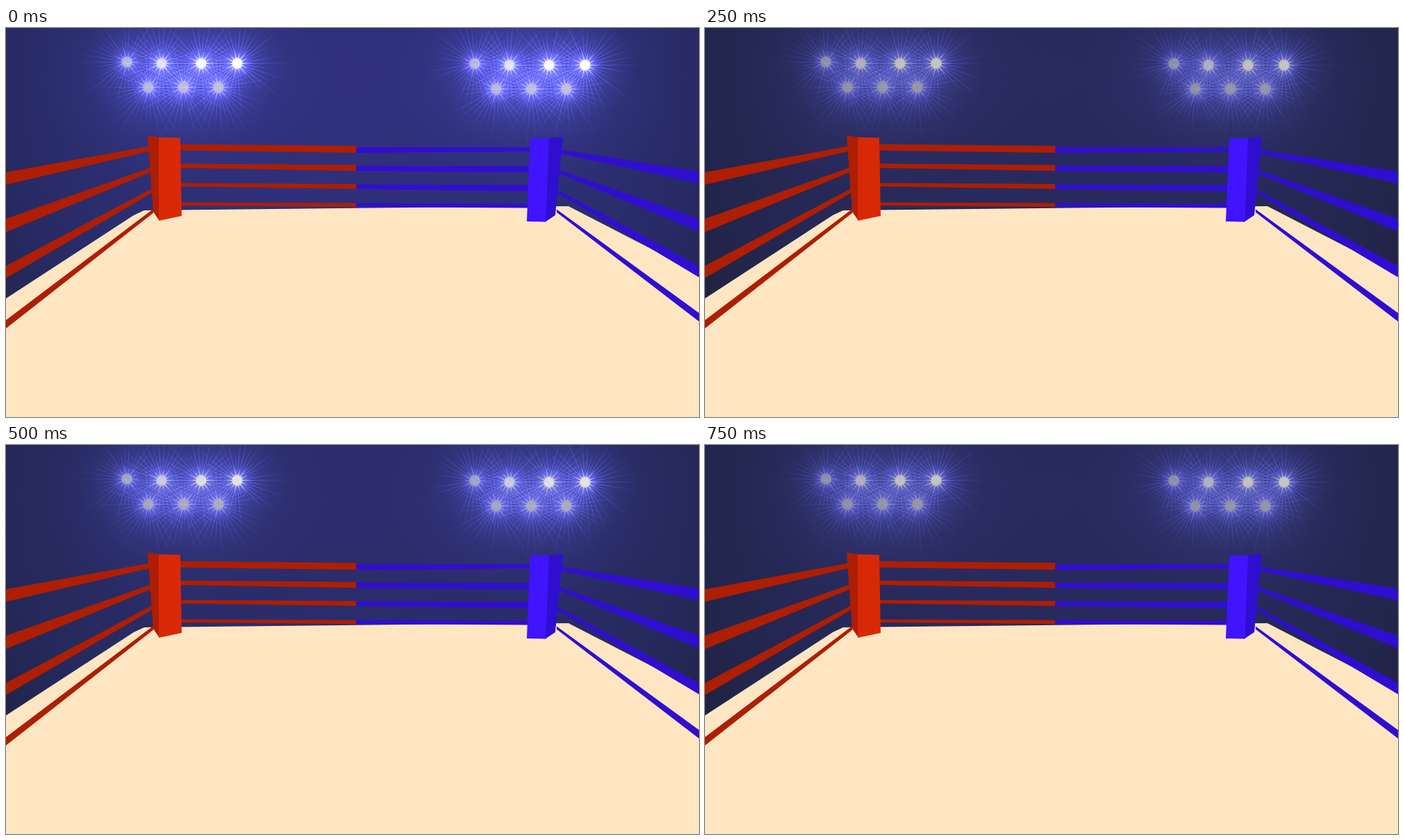
Recreate the animation shown at these times as an HTML page with a canvas. Size 998 by 561 pixels, loop 1000 ms.

```html
<!DOCTYPE html>
<html lang="en">
<head>
<meta charset="utf-8">
<title>Boxing ring</title>
<style>
html, body { margin: 0; width: 100%; height: 100%; overflow: hidden; background: #25285f; }
canvas { display: block; width: 998px; height: 561px; }
</style>
</head>
<body>
<canvas id="stage" width="998" height="561"></canvas>
<script>
const W = 998, H = 561, STEP = 250;
const DIM = [0, 0.25, 0.12, 0.25];
const RED = '#ae1e02', RED_LIT = '#d82906';
const BLUE = '#300ed0', BLUE_LIT = '#4014ff';
const FLOOR = '#ffe6c2';

const ctx = document.getElementById('stage').getContext('2d');
const hall = document.createElement('canvas');
hall.width = W;
hall.height = H;
const g = hall.getContext('2d');

let seed = 11;
function rand() {
  seed = (seed * 16807) % 2147483647;
  return seed / 2147483647;
}

function poly(color, ...pts) {
  ctx.fillStyle = color;
  ctx.beginPath();
  for (let i = 0; i < pts.length; i += 2) ctx.lineTo(pts[i], pts[i + 1]);
  ctx.fill();
}

// Radial fade around (0, 0); each stop is [position, alpha]
function fade(r, rgb, ...stops) {
  const grad = g.createRadialGradient(0, 0, 0, 0, 0, r);
  stops.forEach(([at, alpha]) => grad.addColorStop(at, `rgba(${rgb},${alpha})`));
  return grad;
}

function glow(r, rgb, alpha) {
  g.fillStyle = fade(r, rgb, [0, alpha], [0.35, alpha * 0.6], [0.7, alpha * 0.18], [1, 0]);
  g.fillRect(-r, -r, 2 * r, 2 * r);
}

function star(points, inner, outer, fill) {
  g.fillStyle = fill;
  g.beginPath();
  for (let i = 0; i < points * 2; i++) {
    const r = i % 2 ? inner : outer(i / 2), a = i * Math.PI / points;
    g.lineTo(r * Math.cos(a), r * Math.sin(a));
  }
  g.fill();
}

function lamp(x, y, power) {
  g.save();
  g.translate(x, y);
  g.globalCompositeOperation = 'lighter';
  glow(75, '75,75,165', 0.08 + 0.14 * power);
  star(38, 13, () => 35 + 75 * rand(),
    fade(100, '85,85,185', [0, 0.2 + 0.3 * power], [0.3, 0.13 + 0.1 * power], [1, 0]));
  star(14, 6, i => i % 2 ? 18 : 28,
    fade(28, '170,170,225', [0, 0.2 + 0.5 * power], [0.4, 0.1 + 0.3 * power], [1, 0]));

  g.globalCompositeOperation = 'source-over';
  const tone = Math.round(160 + 95 * power * power);
  star(16, 7, () => 10,
    fade(10, `${tone},${tone},${Math.min(255, tone + 25)}`, [0, 1], [0.6, 0.95], [1, 0]));
  g.restore();
}

function bank(x, y) {
  g.save();
  g.translate(x + 82, y + 20);
  g.scale(1, 0.75);
  g.globalCompositeOperation = 'lighter';
  glow(215, '40,40,95', 0.38);
  g.restore();

  [0, 50, 107, 159].forEach((dx, i) =>
    lamp(x + dx, y + Math.min(i, 1) * 2, 0.42 + 0.58 * Math.sqrt(i / 3)));
  for (let i = 0; i < 3; i++) lamp(x + 31 + 50.5 * i, y + 36.5, 0.48 + 0.05 * i);
}

function paintHall() {
  const wall = g.createRadialGradient(500, 70, 0, 500, 70, 610);
  wall.addColorStop(0, '#30307d');
  wall.addColorStop(0.55, '#2d2f75');
  wall.addColorStop(0.85, '#272a62');
  wall.addColorStop(1, '#22254f');
  g.fillStyle = wall;
  g.fillRect(0, 0, W, H);
  bank(174, 49);
  bank(675, 51.5);
}

// Four ropes between x1 and x2; each end gives [top, thickness] by rope index
function ropes(color, x1, end1, x2, end2) {
  for (let i = 0; i < 4; i++) {
    const [y1, t1] = end1(i), [y2, t2] = end2(i);
    poly(color, x1, y1, x2, y2, x2, y2 + t2, x1, y1 + t1);
  }
}

function paintRing() {
  poly(FLOOR, 0, 390, 184, 270, 199, 263, 620, 258.5, 810, 257,
    934, 321, W, 354, W, H, 0, H);

  ropes(RED, 0, i => [208 + 67 * i + i ** 6 / 60, 18 + 3 * i - 1.65 * i * i],
    212, i => [169.5 + 30.5 * i, 7 - 0.4 * i]);
  ropes(RED, 250, i => [167.5 + 28 * i, 4 + 5 * 0.45 ** i],
    504.5, i => [170 + 27.5 * i, 10 - 1.5 * i]);
  ropes(BLUE, 504.5, i => [172 + 26.8 * i, 8 - 0.8 * i],
    754, i => [172 + 27.2 * i, 6 + 1.5 * i * (3 - i)]);
  ropes(BLUE, 793, i => [174.5 + 29 * i, 5.5 - 0.4 * i],
    W, i => [207 + 68 * i, 17 + 2.6 * i - 1.4 * i * i]);

  poly(RED, 204, 155, 221, 157.5, 221, 278, 212, 265);
  poly(RED_LIT, 220, 157.5, 251, 158.5, 253, 271, 220, 278);
  poly(BLUE, 781, 159, 802, 157, 791, 270, 776, 280);
  poly(BLUE_LIT, 755, 159, 782, 159, 777.5, 279.5, 750, 279);
}

function frame() {
  const step = Math.floor((performance.now() - start) / STEP) % DIM.length;
  ctx.drawImage(hall, 0, 0);
  ctx.fillStyle = `rgba(22,24,10,${DIM[step]})`;
  ctx.fillRect(0, 0, W, H);
  paintRing();
  requestAnimationFrame(frame);
}

paintHall();
const start = performance.now();
frame();
</script>
</body>
</html>
```
